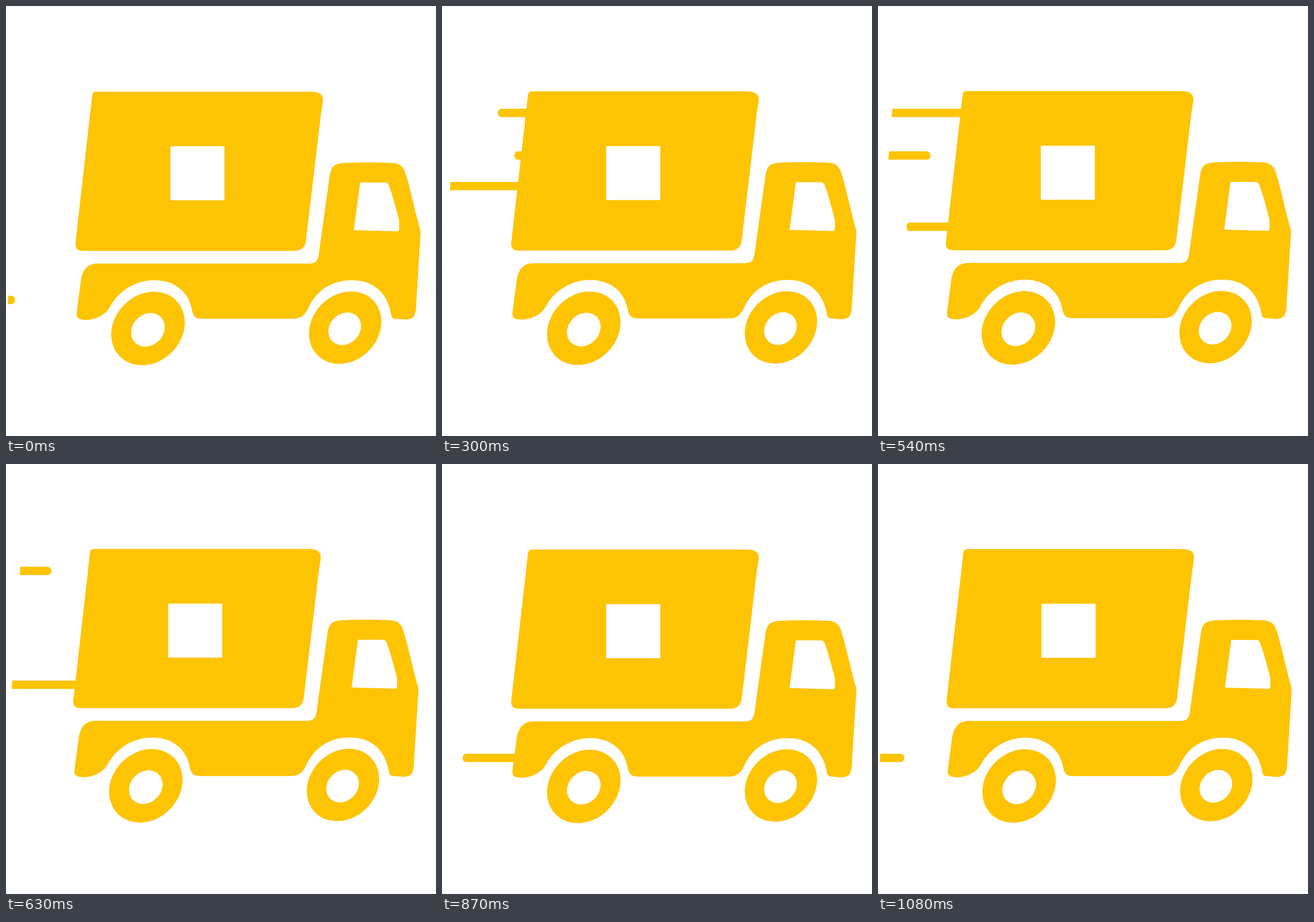
Write an HTML page that moves like this. It is 748 px wide and 748 px high and loops after 1.11 s.

```html
<!DOCTYPE html>
<html lang="en">
<head>
<meta charset="utf-8">
<title>Delivery truck</title>
<style>
  html, body { margin: 0; width: 100%; height: 100%; overflow: hidden; background: #fff; }
  svg { display: block; width: 100%; height: 100%; }
</style>
</head>
<body>
<svg viewBox="0 0 748 748" fill="#fdc404">
  <clipPath id="wake">
    <path d="M25.5 170 L25 179 13.8 320 10 391 3 518 V530 H134 V500 L128 400 156 170Z"/>
  </clipPath>
  <g id="lines" clip-path="url(#wake)"></g>
  <g id="truck">
    <path d="M150 155Q151 149 156 149H529C546 149 553 154 551 168L548 187 522 406
      C521 420 514 426 500 426H134C124 426 120 422 121 411Z"/>
    <rect x="286" y="244" width="94" height="94" fill="#fff"/>
    <path fill-rule="evenodd" d="M123 533L130 480C133 458 142 448 160 448H525
      C538 448 542 445 544 432L563 296C566 278 571 274 590 273Q630 271 670 273
      C685 273 691 279 695 291C704 320 712 360 721 391V398L713 528
      C711 543 706 546 690 545L678 544C671 544 670 540 669 532
      C661 495 636 477 602 477C566 477 540 495 526 525C520 538 513 544 499 544H343
      C329 544 326 540 323 527C317 495 291 477 258 477C224 477 195 497 181 523
      C173 538 155 546 138 546C126 545 122 543 123 533Z
      M616 307H659Q664 307 666 312C672 328 678 350 684 374V387Q684 392 680 392L605 390Z"/>
    <g id="wheels"></g>
  </g>
</svg>
<script>
const LOOP = 1110, STEP = 30, LINE_H = 14.4;
const mod = (a, n) => ((a % n) + n) % n;
const byId = id => document.getElementById(id);

function add(parent, tag, attrs) {
  const el = document.createElementNS("http://www.w3.org/2000/svg", tag);
  for (const key in attrs) el.setAttribute(key, attrs[key]);
  return parent.appendChild(el);
}

function ellipse(cx, cy, rx, ry, fill) {
  add(byId("wheels"), "ellipse", { cx, cy, rx, ry, fill, transform: `rotate(-45 ${cx} ${cy})` });
}
ellipse(247, 561, 69, 58.5, "#fdc404");
ellipse(247, 563.3, 31.6, 26.8, "#fff");
ellipse(590, 559.5, 68, 57.5, "#fdc404");
ellipse(589.2, 561.5, 30.7, 26, "#fff");

// Each line slides left at 1 px/ms; its right end is at `tail` at time `at`.
const lines = [
  { y: 186, tail: 79, at: 630, len: 312, r: 7 },
  { y: 260, tail: 331, at: 300, len: 205, r: 6 },
  { y: 313.3, tail: 40, at: 450, len: 219, r: 7 },
  { y: 384, tail: 59, at: 750, len: 219, r: 4.5 },
  { y: 511.3, tail: 45.5, at: 1080, len: 219.5, r: 6 }
];
for (const line of lines) {
  line.el = add(byId("lines"), "rect", {
    y: line.y - LINE_H / 2, width: line.len, height: LINE_H, rx: line.r
  });
}

// Truck sway: time, x, y
const sway = [
  [0, 0, 0], [300, -0.4, -0.4], [450, -1.8, -0.8], [630, -3.8, -1.2],
  [750, -4.3, -3], [870, -0.4, -0.2], [1080, -1.5, -0.9], [LOOP, 0, 0]
];

function swayAt(t) {
  const i = sway.findIndex(k => k[0] > t);
  const a = sway[i - 1], b = sway[i];
  const p = (t - a[0]) / (b[0] - a[0]);
  return [1, 2].map(n => a[n] + (b[n] - a[n]) * p);
}

function draw(t) {
  byId("truck").setAttribute("transform", `translate(${swayAt(t)})`);
  for (const { el, tail, at, len } of lines) {
    const age = mod(t - at + LOOP / 2, LOOP) - LOOP / 2;
    el.setAttribute("x", tail - len - age);
  }
}

const start = performance.now();
function tick() {
  const elapsed = performance.now() - start;
  draw(mod(Math.floor(elapsed / STEP + 0.001) * STEP, LOOP));
  requestAnimationFrame(tick);
}
tick();
</script>
</body>
</html>
```
